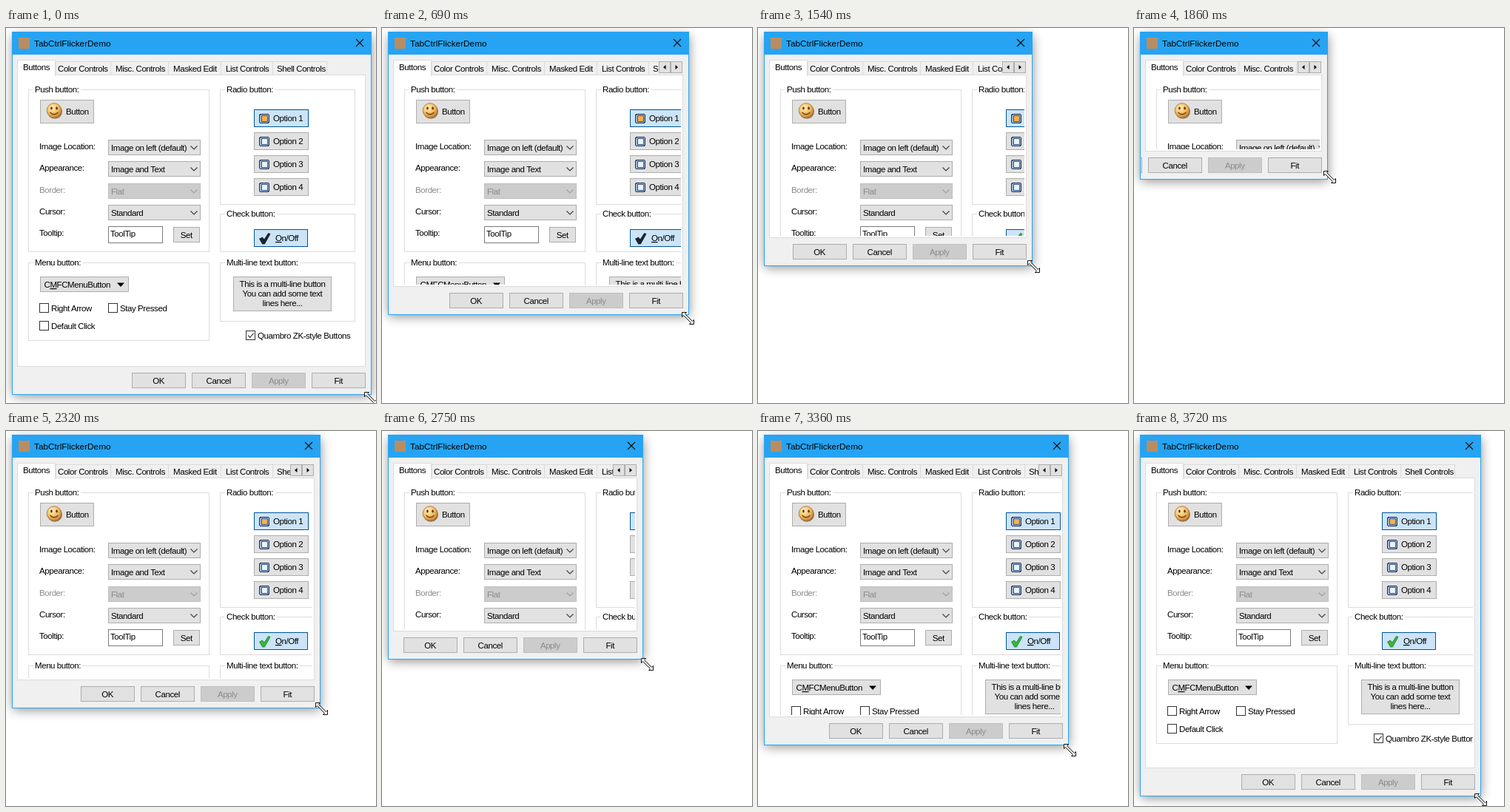
An HTML page for the animation above (3820 ms loop, 500 by 507 pixels).

```html
<!DOCTYPE html>
<html lang="en">
<head>
<meta charset="utf-8">
<title>Resizing dialog</title>
<style>
  html, body { margin: 0; width: 100%; height: 100%; overflow: hidden; background: #fff; }
  svg { display: block; width: 500px; height: 507px; }
  text { font: 11.5px "Liberation Sans", Arial, sans-serif; letter-spacing: -.42px; fill: #000; white-space: pre; }
  text.title { font-size: 11.8px; letter-spacing: 0; }
  text.off { fill: #8b8b8b; }
  text.mid { text-anchor: middle; }
  rect { shape-rendering: crispEdges; }
  .u { text-decoration: underline; }
  .btn { fill: #e1e1e1; stroke: #adadad; }
  .dis { fill: #ccc; stroke: #bfbfbf; }
  .hot { fill: #cce4f7; stroke: #005499; }
  .field { fill: #fff; stroke: #7a7a7a; }
  .box { fill: #fff; stroke: #333; }
  .group { fill: none; stroke: #dcdcdc; }
  .line { fill: none; stroke: #404040; stroke-width: 1.2; }
</style>
</head>
<body>
<svg id="stage" viewBox="0 0 500 507"></svg>
<script>
// Builders; boxes are given by their pixel edges
const rect = (x, y, r, b, cls) =>
  `<rect x="${x + .5}" y="${y + .5}" width="${r - x - 1}" height="${b - y - 1}" class="${cls}"/>`;
const text = (x, y, s, cls = '') => `<text x="${x}" y="${y}" class="${cls}">${s}</text>`;
const fill = (x, y, w, h, c, id = '') => `<rect id="${id}" x="${x}" y="${y}" width="${w}" height="${h}" fill="${c}"/>`;

const group = (x, y, r, b, label, gap) =>
  rect(x, y, r, b, 'group') + fill(x + 7, y - 1, gap, 3, '#fff') + text(x + 9, y + 4, label);

const button = (x, y, r, b, s, cls = 'btn', tcls = '') =>
  rect(x, y, r, b, cls) + text((x + r) / 2 - .3, Math.ceil((y + b) / 2) + 4, s, 'mid ' + tcls);

function combo(y, label, value, off) {
  const c = off ? 'off' : '';
  return text(45, y + 13, label, c) + rect(138, y, 263, y + 21, off ? 'dis' : 'btn') + text(142, y + 15, value, c) +
    `<path class="line" d="M249.5 ${y + 8.5}l4.5 4.5 4.5-4.5" ${off ? 'style="stroke:#a0a0a0"' : ''}/>`;
}

function option(i) {
  const y = 110 + 31 * i, on = i === 0;
  return rect(335, y, 409, y + 24, on ? 'hot' : 'btn') +
    `<rect x="342.5" y="${y + 6.5}" width="13" height="12" rx="2.5" fill="#9eb4d2" stroke="#24365c"/>` +
    `<rect x="345.5" y="${y + 8.5}" width="8" height="8" fill="${on ? '#f5b04c' : '#eaf5f6'}" stroke="#34588c"/>` +
    text(361, y + 16, 'Option ' + (i + 1));
}

const checkbox = (x, y, label, on) => rect(x, y, x + 13, y + 13, 'box') + text(x + 16, y + 11, label) +
  (on ? `<path class="line" d="M${x + 3} ${y + 6.5}l2.7 2.8 5-5.6"/>` : '');

const smiley = `<g transform="translate(65 111.5)">
  <ellipse cx="1" cy="1.5" rx="10" ry="9.8" fill="#70431c" opacity=".7"/>
  <circle r="9.8" fill="url(#face)" stroke="#a8702c" stroke-width=".8"/>
  <g fill="#5a3512"><ellipse cx="-3.5" cy="-3" rx="1.3" ry="1.9"/><ellipse cx="3.5" cy="-3" rx="1.3" ry="1.9"/></g>
  <path d="M-5.5 2.5Q0 8 5.5 2.5" fill="none" stroke="#6b3d14" stroke-width="1.3"/></g>`;

const content =
  group(30, 83, 275, 303, 'Push button:', 64) + rect(46, 97, 119, 129, 'btn') + smiley + text(81, 117, 'Button') +
  combo(151, 'Image Location:', 'Image on left (default)') +
  combo(180, 'Appearance:', 'Image and Text') +
  combo(210, 'Border:', 'Flat', true) +
  combo(239, 'Cursor:', 'Standard') +
  text(45, 281, 'Tooltip:') + rect(138, 268, 212, 291, 'field') + text(141, 282, 'ToolTip') +
  button(226, 269, 262, 290, 'Set') +
  group(289, 83, 472, 239, 'Radio button:', 68) + [0, 1, 2, 3].map(option).join('') +
  group(289, 251, 472, 303, 'Check button:', 70) + rect(335, 272, 408, 296, 'hot') +
  `<path id="tick" d="M342.5 285l4-2 2.5 3 5.5-8.5 2.5 1-7.5 13.5h-3z" stroke-width=".7"/>` +
  text(364, 288, '<tspan class="u">O</tspan>n/Off') +
  group(30, 317, 275, 423, 'Menu button:', 66) + rect(46, 336, 166, 357, 'btn') +
  text(51.5, 351, 'C<tspan class="u">M</tspan>FCMenuButton') + '<path d="M150 344.5h10l-5 5.5z"/>' +
  checkbox(45, 372, 'Right Arrow') + checkbox(138, 372, 'Stay Pressed') + checkbox(45, 396, 'Default Click') +
  group(289, 317, 472, 397, 'Multi-line text button:', 101) + rect(307, 336, 440, 383, 'btn') +
  ['This is a multi-line button', 'You can add some text', 'lines here...']
    .map((s, i) => text(373.5, 350 + 13 * i, s, 'mid')).join('') +
  checkbox(324, 409, 'Quambro ZK-style Buttons', true);

const tabs = [[67, 70, 'Color Controls'], [141, 148, 'Misc. Controls'], [219, 226, 'Masked Edit'],
  [290, 297, 'List Controls'], [360, 366, 'Shell Controls']]
  .map(([x, tx, s], i, all) => rect(x, 45, (all[i + 1] || [433])[0] + 1, 64, 'group') + text(tx, 59, s)).join('');

const footer = ['OK', 'Cancel', 'Apply', 'Fit'].map((s, i) =>
  button(-323 + 81 * i, -29, -250 + 81 * i, -8, s, i === 2 ? 'dis' : 'btn', i === 2 ? 'off' : '')).join('');

const clip = (id, x, y) => `<clipPath id="${id}Clip"><rect id="${id}Box" x="${x}" y="${y}" width="1" height="1"/></clipPath>`;

document.getElementById('stage').innerHTML = `
  <defs>
    ${clip('win', 9, 6)}${clip('page', 16, 64)}${clip('tabs', 15, 40)}
    <radialGradient id="face" cx=".38" cy=".32" r=".75">
      <stop offset="0" stop-color="#fff0c4"/><stop offset=".5" stop-color="#f5c165"/><stop offset="1" stop-color="#c37b2c"/>
    </radialGradient>
    <filter id="blur" filterUnits="userSpaceOnUse" x="-30" y="-30" width="580" height="580"><feGaussianBlur stdDeviation="7.5"/></filter>
  </defs>
  <rect id="shade" x="9" y="10" fill="#000" opacity=".45" filter="url(#blur)"/>
  ${fill(8, 5, 1, 1, '#26a4f3', 'frame')}
  ${fill(9, 36, 1, 1, '#f0f0f0', 'body')}
  ${fill(17, 13, 15, 15, '#b98d62')}
  ${text(38, 25, 'TabCtrlFlickerDemo', 'title')}
  <path id="close" d="M-5-5L5 5M5-5L-5 5" stroke="#111" stroke-width="1.15"/>
  <rect id="page" x="15.5" y="63.5" fill="#fff" stroke="#dcdcdc"/>
  <g clip-path="url(#tabsClip)">${tabs}
    <path d="M15.5 64.5v-21h51v21" fill="#fff" stroke="#dcdcdc" shape-rendering="crispEdges"/>${text(23, 57, 'Buttons')}</g>
  <g id="arrows">${rect(-40, 45, -24, 61, 'btn')}${rect(-24, 45, -8, 61, 'btn')}
    <path d="M-30.5 50v6l-3.5-3zM-17.5 50v6l3.5-3z"/></g>
  <g clip-path="url(#pageClip)">${content}</g>
  <g clip-path="url(#winClip)"><g id="footer">${footer}</g></g>
  <path id="cursor" d="M-8-8h6l-2 2 10 10 2-2v6h-6l2-2-10-10-2 2z" fill="#fff" stroke="#111"/>`;

const el = {};
document.querySelectorAll('[id]').forEach(e => el[e.id] = e);

const LOOP = 3820, START = 230, STEP = 46.53;

// step, right edge, bottom edge, pointer offset x and y
const drag = [
  [-1, 493, 495, -1, 5], [10, 414, 387, -1, 5], [14, 440, 418, 0, 5], [21, 343, 297, 2, 3],
  [26, 385, 336, 2, 2], [35, 261, 204, 3, -3], [43, 430, 380, 2, 1], [54, 352, 308, 6, 7],
  [59, 422, 415, 2, 4], [63, 394, 394, 3, 5], [67, 419, 424, 2, 7], [71, 464, 478, 2, 4], [75, 468, 493, 0, 5]
];

function poseAt(step) {
  let i = 1;
  while (i < drag.length - 1 && drag[i][0] < step) i++;
  const a = drag[i - 1], b = drag[i];
  const p = Math.min(1, Math.max(0, (step - a[0]) / (b[0] - a[0])));
  const e = (1 - Math.cos(Math.PI * p)) / 2;
  return a.map((v, j) => Math.round(v + (b[j] - v) * e));
}

function size(e, w, h) {
  e.setAttribute('width', w);
  e.setAttribute('height', h);
}
const move = (e, x, y) => e.setAttribute('transform', `translate(${x} ${y})`);

function draw(t) {
  const step = t < START ? -1 : Math.floor((t - START) / STEP + .25);
  const [, r, b, dx, dy] = poseAt(step);
  const scroll = r < 442;
  size(el.shade, r - 8, b - 7);
  size(el.frame, r - 7, b - 4);
  size(el.body, r - 9, b - 36);
  size(el.winBox, r - 9, b - 6);
  size(el.page, r - 23, b - 101);
  size(el.pageBox, r - 26, b - 104);
  size(el.tabsBox, r - (scroll ? 55 : 21), 25);
  el.arrows.style.display = scroll ? '' : 'none';
  move(el.arrows, r, 0);
  move(el.close, r - 15, 20);
  move(el.footer, r, b);
  move(el.cursor, r + dx + .5, b + dy + .5);
  const green = step >= 24;
  el.tick.setAttribute('fill', green ? '#35b53a' : '#1c2430');
  el.tick.setAttribute('stroke', green ? '#16701f' : '#0c1016');
}

function tick() {
  draw(performance.now() % LOOP);
  requestAnimationFrame(tick);
}
tick();
</script>
</body>
</html>
```
